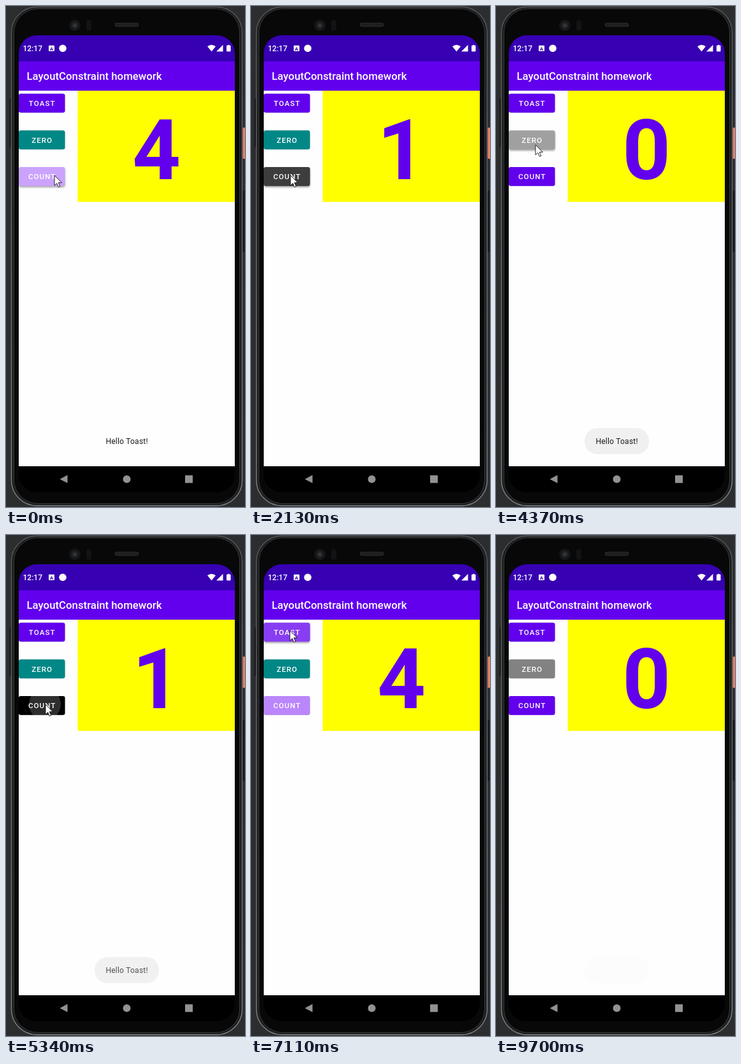
Animation, 375 px wide and 787 px high, one loop 9.82 s. Source, as an HTML page:

```html
<!DOCTYPE html>
<html lang="en">
<head>
<meta charset="utf-8">
<title>LayoutConstraint homework</title>
<style>
  html, body { margin: 0; width: 100%; height: 100%; overflow: hidden; background: #2c2d2f; }
  svg { display: block; width: 100%; height: 100%; font-family: Roboto, sans-serif; }
  .label { font-size: 11.6px; font-weight: 500; letter-spacing: 1.03px; fill: #fff; text-anchor: middle; }
  .bold { font-weight: 500; fill: #fff; }
  #digit { font-size: 132px; font-weight: 700; fill: #6200ee; text-anchor: middle; }
  #toastText { font-size: 12.1px; letter-spacing: .2px; fill: #1c1c1c; text-anchor: middle; }
</style>
</head>
<body>
<svg viewBox="0 0 375 787" preserveAspectRatio="none">
  <defs>
    <clipPath id="screen"><rect x="20" y="46" width="339" height="718" rx="28"/></clipPath>
    <linearGradient id="rim" x2="0" y2="1">
      <stop offset="0" stop-color="#55575a"/>
      <stop offset=".5" stop-color="#6d6f72"/>
      <stop offset="1" stop-color="#808285"/>
    </linearGradient>
  </defs>

  <!-- phone body -->
  <rect width="375" height="787" fill="#2c2d2f"/>
  <rect x="5.5" y="145" width="4" height="77" rx="1" fill="#191a1b"/>
  <rect x="370" y="290" width="4.5" height="96" rx="1" fill="#191a1b"/>
  <rect x="371.5" y="191" width="4" height="49" rx="1" fill="#e8826a"/>
  <rect x="8.5" y="1.5" width="362" height="783.5" rx="40" fill="#1d1e1f" stroke="url(#rim)" stroke-width="1.4"/>
  <rect x="12.5" y="4.5" width="354" height="777" rx="37" fill="#080809" stroke="#36383a"/>
  <circle cx="108" cy="30.500" r="9" fill="#151617"/>
  <circle cx="108" cy="30.500" r="5" fill="#242628"/>
  <circle cx="108" cy="30.500" r="2" fill="#3b3e42"/>
  <rect x="126" y="22" width="8" height="17" rx="4" fill="#121314"/>
  <rect x="171" y="27" width="37" height="5" rx="2.500" fill="#1c1d1e" stroke="#2e3032"/>

  <g clip-path="url(#screen)">
    <rect x="20" y="46" width="339" height="718"/>
    <rect x="20" y="132" width="339" height="591" fill="#fefefe"/>
    <rect x="20" y="46" width="339" height="41" fill="#3700b3"/>
    <rect x="20" y="87" width="339" height="46" fill="#6200ee"/>
    <rect x="112.500" y="133" width="246.500" height="174.700" fill="#ff0"/>
  </g>

  <!-- status bar -->
  <text class="bold" x="26.500" y="71" font-size="12">12:17</text>
  <rect x="67" y="62" width="9" height="9" rx="1" fill="#fff"/>
  <text x="71.500" y="69.500" font-size="8" font-weight="700" text-anchor="middle" fill="#3700b3">A</text>
  <circle cx="89" cy="66.500" r="5.800" fill="#fff"/>
  <path fill="#fff" d="M316 63.500Q322.500 58.500 329 63.500L322.500 71.500ZM340.500 61V71.500H330ZM346 63q0-1 1-1h1v-1h2.500v1h1q1 0 1 1v7.500q0 1-1 1H347q-1 0-1-1Z"/>
  <text class="bold" x="32.500" y="116" font-size="16.800">LayoutConstraint homework</text>

  <text id="digit" x="236" y="272"></text>
  <g id="buttons"></g>
  <rect id="bubble" x="139" y="663" width="101" height="41" rx="20" fill="#f0f0f0"/>
  <text id="toastText" x="189.600" y="688">Hello Toast!</text>

  <!-- navigation bar -->
  <g fill="#929292">
    <path d="M84.500 743.200L96.500 736.800V749.600Z"/>
    <circle cx="189.500" cy="743.200" r="6"/>
    <rect x="281" y="737.200" width="12" height="12" rx=".5"/>
  </g>
  <path id="cursor" d="M0 0V16L3.700 12.500L6.300 18.500L8.800 17.400L6.200 11.600H11.300Z" fill="#fff" stroke="#111" stroke-width=".9"/>
</svg>

<script>
const LOOP = 9820;
const TOAST = 0, ZERO = 1, COUNT = 2;
const $ = id => document.getElementById(id);

// Step tracks: each row holds from its time until the next row.
const cursorTrack = [
  [0, 76, 266], [520, 72, 246], [650, 67, 224], [780, 65, 212],
  [1580, 64, 230], [1710, 63, 256], [1850, 62, 266],
  [2670, 62, 215], [2800, 62, 164], [2930, 62, 141],
  [3590, 62, 180], [3710, 62, 215], [3840, 62, 218],
  [4650, 62, 242], [4790, 62, 266],
  [6310, 67, 196], [6460, 63, 162], [6610, 61, 150],
  [7650, 62, 172], [7770, 62, 203], [7890, 62, 215],
  [8820, 110, 330], [8950, 200, 530], [9080, 291, 729], [9220, -50, -50]
];
const digitTrack = [
  [0, 4], [1320, 0], [2120, 1], [4370, 0], [5190, 1],
  [5480, 2], [5750, 3], [6010, 4], [8560, 0]
];
// start, end, button
const presses = [
  [-200, 120, COUNT], [1050, 1460, ZERO], [1980, 2380, COUNT], [3060, 3450, TOAST],
  [4220, 4520, ZERO], [5050, 5300, COUNT], [5340, 5560, COUNT], [5610, 5820, COUNT],
  [5880, 6160, COUNT], [6990, 7260, TOAST], [8290, 8690, ZERO]
];
// fade-in start, fade-out start
const toasts = [[-2000, 520], [3330, 5340], [7260, 9340]];

const clamp = v => Math.min(1, Math.max(0, v));
const at = (track, t) => track.filter(row => row[0] <= t).pop();

function svg(parent, tag, attrs) {
  const el = document.createElementNS('http://www.w3.org/2000/svg', tag);
  set(el, attrs);
  return parent.appendChild(el);
}

function set(el, attrs) {
  for (const key in attrs) el.setAttribute(key, attrs[key]);
}

const buttons = ['TOAST', 'ZERO', 'COUNT'].map((label, i) => {
  const box = { x: 20, y: 137.8 + 57.6 * i, width: 72.5, height: 29.8, rx: 3.3 };
  const group = svg($('buttons'), 'g', {});
  const clip = svg(group, 'clipPath', { id: 'clip' + i });
  svg(clip, 'rect', box);
  const face = svg(group, 'rect', box);
  const ripple = svg(group, 'circle', { fill: '#fff', 'clip-path': `url(#clip${i})` });
  svg(group, 'text', { class: 'label', x: 56.7, y: box.y + 19.2 }).textContent = label;
  return { face, ripple };
});

function drawButton(i, color, t, x, y) {
  const { face, ripple } = buttons[i];
  const press = presses.find(([from, to, id]) => id === i && t >= from && t < to);
  const full = press && t - press[0] >= 120;
  face.setAttribute('fill', color);
  face.style.filter = full
    ? 'drop-shadow(0 2px 1.6px rgba(0,0,0,.36))'
    : 'drop-shadow(0 .8px .7px rgba(0,0,0,.32))';
  set(ripple, { cx: x - 1, cy: y, r: full ? 90 : 25, opacity: press ? (full ? .24 : .18) : 0 });
}

function drawToast(t) {
  const current = toasts.filter(([from]) => from <= t).pop();
  const [from, out] = current;
  const rise = clamp((Math.floor((t - from) / 125) + 1) / 3);
  const fall = t < out ? 0 : (Math.floor((t - out) / 120) + 1) / 4;
  const text = rise * (1 - clamp(fall));
  const bubble = from < 0 ? 0 : rise * clamp(1.15 - fall);
  $('toastText').setAttribute('opacity', text);
  $('bubble').setAttribute('opacity', fall > 1 ? 0 : bubble);
}

function draw(t) {
  const [, x, y] = at(cursorTrack, t);
  const n = at(digitTrack, t)[1];
  $('digit').textContent = n;
  $('cursor').setAttribute('transform', `translate(${x} ${y})`);
  drawButton(TOAST, '#6200ee', t, x, y);
  drawButton(ZERO, n ? '#018786' : '#828282', t, x, y);
  drawButton(COUNT, n ? (n % 2 ? '#000' : '#bb86fc') : '#6200ee', t, x, y);
  drawToast(t);
}

const start = performance.now();
function tick() {
  draw((performance.now() - start) % LOOP);
  requestAnimationFrame(tick);
}
tick();
</script>
</body>
</html>
```
